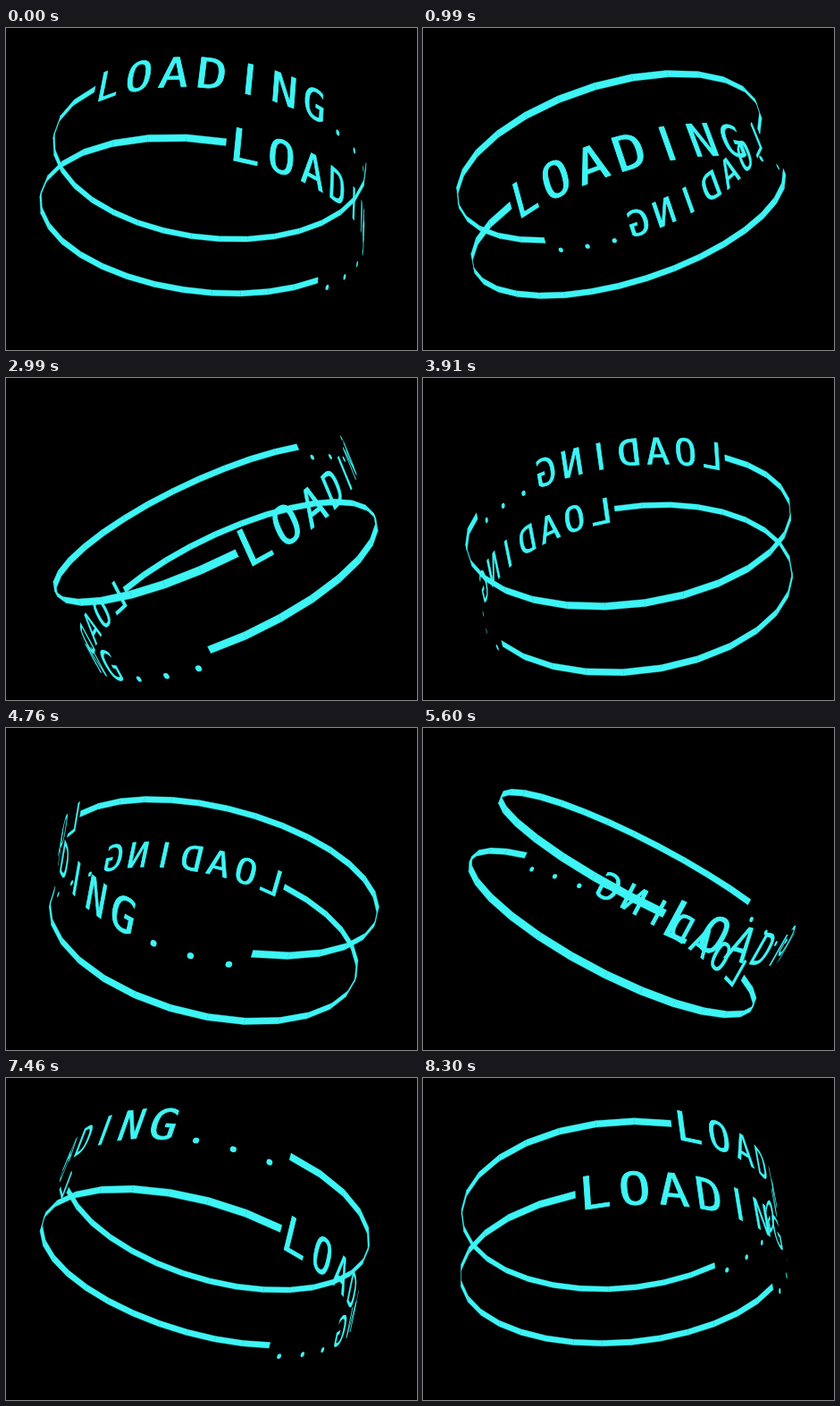
These frames come from a looping animation (460 by 360 pixels, 8.38 s). An HTML page:

```html
<!DOCTYPE html>
<html lang="en">
<head>
<meta charset="utf-8">
<title>Loading</title>
<style>
  html, body { margin: 0; width: 100%; height: 100%; overflow: hidden; background: #000; }
  svg { display: block; width: 460px; height: 360px; }
  path { fill: #3ef4f4; stroke: #3ef4f4; stroke-width: .4; stroke-linejoin: round; }
  text {
    font: 400 50px "DejaVu Sans Mono", monospace;
    text-anchor: middle;
    fill: #3ef4f4; stroke: #3ef4f4; stroke-width: .8; stroke-linejoin: round;
  }
  text.stem { font-family: "DejaVu Sans", sans-serif; }
  text.dot { font-family: "Noto Sans Mono", monospace; stroke: none; }
</style>
</head>
<body>
<svg id="stage" viewBox="0 0 460 360"></svg>
<script>
const LOOP = 8380, FRAME = 76.9, LAST_FRAME = 108;
const RAD = Math.PI / 180;
const STEP = 3.52;              // degrees the tilted axis turns per frame
const TILT = 30, VIEW = 1000;
const FACES = 30, FACE_ANGLE = 360 / FACES;
const APOTHEM = 176.2;
const HALF_FACE = APOTHEM * Math.tan(FACE_ANGLE / 2 * RAD);
const HALF_BAR = 3.9, BASELINE = 18.2;
const LABEL = "LOADING...";
const GLYPH_CLASS = { "I": "stem", ".": "dot" };

const sin = deg => Math.sin(deg * RAD), cos = deg => Math.cos(deg * RAD);
const stage = document.getElementById("stage");

function add(tag) {
  return stage.appendChild(document.createElementNS("http://www.w3.org/2000/svg", tag));
}

// Each ring has 30 flat faces: ten hold one character, the rest form the bar.
function makeRing(height, start, speed) {
  const faces = Array.from({ length: FACES }, (_, i) => {
    const char = LABEL[i];
    const node = add(char ? "text" : "path");
    if (char) {
      node.textContent = char;
      node.setAttribute("y", BASELINE);
      node.setAttribute("class", GLYPH_CLASS[char] || "letter");
    }
    return node;
  });
  return { height, start, speed, faces };
}

const rings = [makeRing(38.5, -42.6, 3), makeRing(-38.5, 6.2, -1)];

function makeCamera(turn) {
  const lean = 12 - turn;
  const ux = sin(TILT) * sin(lean), uy = cos(TILT), uz = -sin(TILT) * cos(lean);
  // The centre sways sideways as the view passes from below to above.
  const cx = 227.5 - 5.1 * Math.tanh(5 * cos(turn - 15)), cy = 189;
  return (angle, along, height) => {
    const vx = APOTHEM * sin(angle) + along * cos(angle);
    const vz = APOTHEM * cos(angle) - along * sin(angle);
    const dot = ux * vx + uz * vz, fold = height - dot / (1 + uy);
    const scale = VIEW / (VIEW - vz - fold * uz);
    return [cx + scale * (vx + fold * ux), cy - scale * (height * uy - dot)];
  };
}

function placeChar(node, point) {
  const d = 10, [x, y] = point(0, 0);
  const slope = (p, q) => p.map((v, i) => (v - q[i]) / (2 * d));
  const across = slope(point(d, 0), point(-d, 0));
  const down = slope(point(0, d), point(0, -d));
  const m = [...across, ...down, x, y].map(v => v.toFixed(4));
  node.setAttribute("transform", `matrix(${m})`);
}

function placeBar(node, point) {
  const w = HALF_FACE, h = HALF_BAR;
  const corners = [[-w, -h], [w, -h], [w, h], [-w, h]]
    .map(c => point(...c).map(v => v.toFixed(2)));
  node.setAttribute("d", `M${corners.join("L")}Z`);
}

function draw(time) {
  const frame = Math.min(LAST_FRAME, Math.floor((time % LOOP + 18) / FRAME));
  const turn = frame * STEP;
  const project = makeCamera(turn);
  for (const { height, start, speed, faces } of rings) {
    faces.forEach((node, i) => {
      const angle = start + speed * turn + (i + .5) * FACE_ANGLE;
      const point = (x, y) => project(angle, x, height - y);
      (i < LABEL.length ? placeChar : placeBar)(node, point);
    });
  }
}

const begin = performance.now();
function tick() {
  draw(performance.now() - begin);
  requestAnimationFrame(tick);
}
tick();
</script>
</body>
</html>
```
